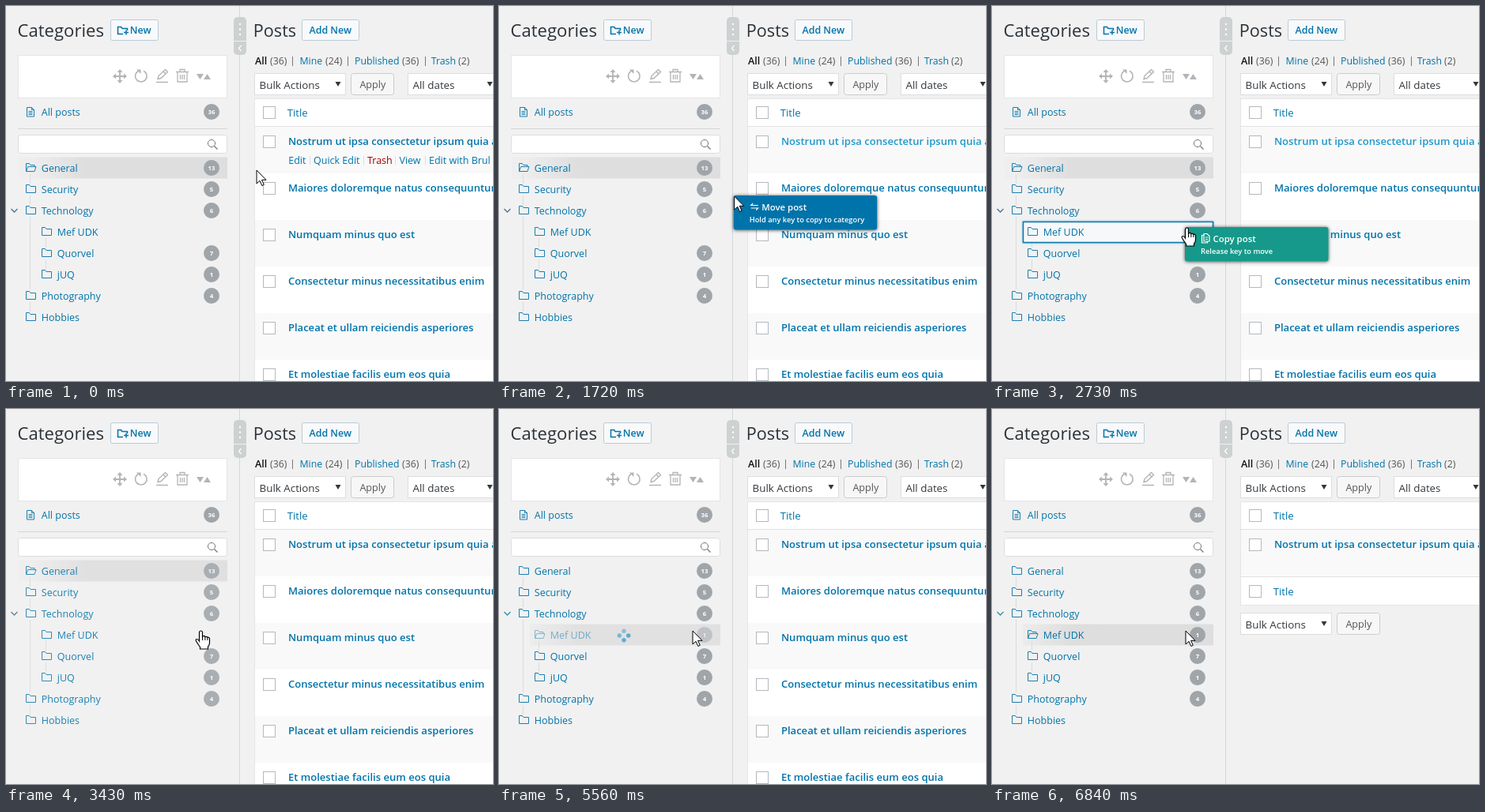
An HTML page that plays this animation: 616x475 px, repeating every 7910 ms.

```html
<!DOCTYPE html>
<html lang="en">
<head>
<meta charset="utf-8">
<title>Post categories</title>
<style>
html, body { margin: 0; width: 100%; height: 100%; overflow: hidden; background: #f1f1f1; }
svg { display: block; width: 100vw; height: 100vh; font-family: "Open Sans", "Noto Sans", sans-serif; }
</style>
</head>
<body>
<svg id="stage" viewBox="0 0 616 475"></svg>
<script>
const LOOP = 7910;
const BLUE = '#0073aa', HOVER = '#1f98cc', INK = '#2c3238', GREY = '#a0a5aa', TOOL = '#b2b5b8';
const stage = document.getElementById('stage');

// ---- markup helpers
const text = (x, y, size, fill, str, more = '') =>
  `<text x="${x}" y="${y}" font-size="${size}" fill="${fill}" ${more}>${str}</text>`;
const rect = (x, y, w, h, fill, stroke = 'none', r = 0, more = '') =>
  `<rect x="${x}" y="${y}" width="${w}" height="${h}" rx="${r}" fill="${fill}" stroke="${stroke}" ${more}/>`;
const line = (d, stroke, w = 1, more = '') =>
  `<path d="${d}" fill="none" stroke="${stroke}" stroke-width="${w}" ${more}/>`;
const shape = (d, fill) => `<path d="${d}" fill="${fill}"/>`;
const group = (id, body, x = 0, y = 0) => `<g id="${id}" transform="translate(${x} ${y})">${body}</g>`;
const semi = 'font-weight="600"';
const badge = (y, n, id = '') => `<g ${id}><circle cx="260" cy="${y}" r="10" fill="${GREY}"/>` +
  text(260, y + 2.8, 7.8, '#fff', n, 'font-weight="700" text-anchor="middle"') + '</g>';

// ---- sidebar
const FOLDER = 'M.5 10.5V.5h4l1.5 2h6.5v8z';
const OPEN = 'M.5 10.5V.5h4l1.5 2h5v2M.5 10.5l2.3-6h10.2l-2 6z';
const PAGE = 'M.5 .5h6l3 3v8.500h-9zM6.500 .5v3h3M2.500 5.500h5M2.500 7.500h5M2.500 9.500h5';
const PAGES = 'M3 2.5V.5h4l3 3v6.5H3zM3 2.5H.5v9.5h7v-2M5 5h3M5 7.5h3';
const nodes = [
  ['General', 0, 13], ['Security', 0, 5], ['Technology', 0, 6], ['Mef UDK', 1, 1],
  ['Quorvel', 1, 7], ['jUQ', 1, 1], ['Photography', 0, 4], ['Hobbies', 0, 0]
];

function treeRow([name, level, count], i) {
  const x = 25 + 20 * level, y = 205 + 27 * i;
  return group('row' + i,
    `<path id="icon${i}" d="${FOLDER}" transform="translate(${x} ${y - 6})" fill="none" stroke="#1b7fb0"/>` +
    text(x + 19.8, y + 4.8, 12.5, BLUE, name) +
    (count ? badge(y, count, `id="count${i}"`) : ''));
}

function sidebar() {
  const button = rect(132.5, 17.5, 60, 26, '#f8f9fa', '#b9cbd6', 2) +
    line('M148 35.5h-6.5v-9h4l1.5 2h6.5v2.5M149 33.5h6M152 30.5v6', BLUE, 1.5) +
    text(156.8, 35.3, 12.4, BLUE, 'New', semi);
  const tools = rect(15.5, 62.5, 264, 54, '#fff', '#e5e5e5') +
    line('M144 82v14M137 89h14', TOOL, 1.8) +
    shape('M144 80l3.5 4h-7zM144 98l3.5-4h-7zM135 89l4-3.5v7zM153 89l-4-3.5v7z', TOOL) +
    line('M167 82.5a7.3 7.3 0 1 0 7-.3', TOOL, 1.6) + shape('M165 80.5h5.5v5.5z', TOOL) +
    line('M190 96.5h15M192 92.5l1-4 8.500-8 3 3-8.500 8zM199 83l3 3', TOOL, 1.4) +
    line('M215 83.5h16M220 83v-2.5h6v2.5M217 84v12h12v-12M220.5 87v6M223 87v6M225.5 87v6', TOOL, 1.3) +
    shape('M241 86h9l-4.5 7zM250 93h9l-4.5-7z', TOOL);
  return text(14.6, 39, 22.1, INK, 'Categories') + button + tools +
    line(PAGE, '#1b7fb0', 1, 'transform="translate(26 128)"') +
    text(44.8, 138.8, 12.5, BLUE, 'All posts') + badge(134, 36) +
    line('M15 155.5h265', '#d5d5d5') +
    rect(15.5, 163.5, 264, 23, '#fff', '#ddd', 3) +
    `<circle cx="260" cy="174" r="4.6" fill="none" stroke="#777"/>` + line('M263.5 177.5l4 4', '#777', 1.2) +
    `<g id="tree">` +
    rect(16, 191.5, 264, 27, 'url(#fade)', 'none', 0, 'id="sel"') +
    line('M30.5 213v12M30.5 240v12M30.5 267v92M30.5 375v12M50.5 294v12M50.5 321v12', '#dcdcdc') +
    `<path id="chevron" d="M6.5 257l4 4 4-4" fill="none" stroke-width="1.3"/>` +
    rect(0, 0, 0, 26, '#f6f8f9', '#0f78ad', 0, 'id="drop" stroke-width="1.5" filter="url(#glow)"') +
    nodes.map(treeRow).join('') + '</g>' +
    group('spin', '<g id="dots">' + '<circle r="2.7" fill="#3a9bcb"/>'.repeat(4) + '</g>', 158, 287);
}

function divider() {
  return line('M295.5 0v475', '#d4d6d8') + rect(288, 14, 16, 48, '#cdd1d1', 'none', 5) +
    line('M288 44.5h16', '#f1f1f1') +
    [23, 29.5, 36].map(y => `<circle cx="296" cy="${y}" r="1.2" fill="#fff"/>`).join('') +
    line('M297.5 50l-3 3.5 3 3.5', '#fff', 1.2);
}

// ---- post list
const posts = [
  'Nostrum ut ipsa consectetur ipsum quia aut', 'Maiores doloremque natus consequuntur',
  'Numquam minus quo est', 'Consectetur minus necessitatibus enim',
  'Placeat et ullam reiciendis asperiores', 'Et molestiae facilis eum eos quia'
];
const check = y => rect(325.5, y - 7.5, 15, 15, '#fff', '#b4b9be');
const select = (x, y, w, label) => rect(x + .5, y + .5, w - 1, 27, '#fff', '#ddd') +
  text(x + 6.5, y + 19.8, 13.4, '#32373c', label) + shape(`M${x + w - 13.5} ${y + 11}h7l-3.5 6z`, '#32373c');
const bulk = y => select(314, y, 116, 'Bulk Actions') +
  rect(436.5, y + .5, 54, 27, '#f7f7f7', '#ccc', 3) + text(447.4, y + 19, 12.6, '#555', 'Apply');
const titleBar = y => check(y) + text(355.8, y + 4.8, 13.1, BLUE, 'Title');
const post = (i, id = '') => rect(315, 153 + 59 * i, 310, 59, i % 2 ? '#fff' : '#f9f9f9') + check(172 + 59 * i) +
  text(356.9, 176 + 59 * i, 13.07, BLUE, posts[i], semi + id);
const tableTop = h => select(508, 85, 114, 'All dates') + bulk(85) +
  rect(314.5, 117.5, 320, h, '#fff', '#e5e5e5') + line('M314 152.5h302', '#e1e1e1') + titleBar(135);

function lists() {
  const actions = [[357.2, 'Edit'], [389, 'Quick Edit'], [457, 'Trash', '#a00'], [497.5, 'View'], [535, 'Edit with Brul']];
  return `<g id="all">` + tableTop(400) + posts.map((p, i) => post(i, i ? '' : ' id="first"')).join('') +
    `<g id="actions">` + actions.map(([x, s, c = BLUE]) => text(x, 199.8, 12.5, c, s)).join('') +
    line('M384.5 190v11M452.5 190v11M492.5 190v11M530.5 190v11', '#ddd') + '</g></g>' +
    `<g id="one">` + tableTop(131) + post(0) + line('M314 212.5h302', '#e1e1e1') +
    titleBar(231) + bulk(258) + '</g>';
}

function heading() {
  const views = [[334, '(36)', '#555'], [371.5, 'Mine'], [404, '(24)', '#555'], [441, 'Published'],
    [501, '(36)', '#555'], [537.8, 'Trash'], [572, '(2)', '#555']];
  return text(312.8, 39, 21.6, INK, 'Posts') +
    rect(374.5, 17.5, 72, 26, '#f8f9fa', '#b9cbd6', 2) + text(383.5, 35.3, 12.4, BLUE, 'Add New', semi) +
    text(315, 74, 12.5, '#111', 'All', semi) +
    views.map(([x, s, c = BLUE]) => text(x, 74, 12.3, c, s)).join('') +
    line('M362.5 64v12M432.5 64v12M530.5 64v12', '#777');
}

// ---- drag label and pointer
function label(id, fill, icon, title, hint) {
  return `<g id="${id}">` + rect(0, 0, 181.5, 43.5, fill, 'none', 3, 'filter="url(#shadow)"') + icon +
    text(35.5, 19, 11.4, '#fff', title, semi) + text(20, 34.4, 9.3, '#fff', hint, semi) + '</g>';
}
const swap = line('M31 12.5h-9l2.5-2.5M22 16h9l-2.5 2.5', '#fff', 1.1);
const copy = line(PAGES, '#fff', 1.2, 'transform="translate(21 8)"');
const hand = 'M-2 13V2a2 2 0 0 1 4 0V8a1.7 1.7 0 0 1 3.4 0a1.7 1.7 0 0 1 3 .6a1.6 1.6 0 0 1 2.6 1.4' +
  'V15q0 3-2 5v3H-1v-2.5q-3-4-5-7.5q-1-2.5 1-2.5q1.5 0 3 2.5z';

stage.innerHTML = `<defs>
  <linearGradient id="fade" gradientUnits="userSpaceOnUse" x1="30" y1="0" x2="100" y2="0">
    <stop offset="0" stop-color="#dedede" stop-opacity=".15"/><stop offset="1" stop-color="#dedede"/>
  </linearGradient>
  <filter id="glow" x="-10%" y="-40%" width="120%" height="180%">
    <feDropShadow dx="0" dy="0" stdDeviation="1.3" flood-color="#1e8cbe" flood-opacity=".8"/></filter>
  <filter id="shadow" x="-10%" y="-30%" width="120%" height="170%">
    <feDropShadow dx="0" dy=".5" stdDeviation="2" flood-color="#000" flood-opacity=".7"/></filter>
  </defs>` + rect(0, 0, 616, 475, '#f1f1f1') + heading() + lists() + sidebar() + divider() +
  group('tip', label('move', BLUE, swap, 'Move post', 'Hold any key to copy to category') +
    label('copy', '#16998a', copy, 'Copy post', 'Release key to move')) +
  group('pointer',
    `<path id="arrow" d="M0 0V17L4 13.3L6.8 19.5L9.3 18.4L6.6 12.3H12z" fill="#fff" stroke="#000"/>` +
    `<g id="hand" transform="translate(1.5 0)"><path d="${hand}" fill="#fff" stroke="#000" stroke-width="1.2"/>` +
    line('M2 8v4M5.4 8.5v3.5M8.4 9v3', '#000') + '</g>');

// ---- motion
const el = {};
stage.querySelectorAll('[id]').forEach(n => el[n.id] = n);
const set = (id, name, v) => el[id].setAttribute(name, v);
const show = (id, on) => set(id, 'display', on ? 'inline' : 'none');
const ramp = (t, a, b) => Math.max(0, Math.min(1, (t - a) / (b - a)));

// the screen refreshes at these moments only
const ticks = [0, 350, 420, 500, 570, 650, 720, 1090, 1160, 1230, 1330, 1410, 1490, 1570, 1640, 1720, 1800, 1880,
  1950, 2020, 2100, 2180, 2250, 2730];
for (let t = 3360; t <= 4090; t += 73) ticks.push(t);
for (let t = 5560; t <= 6840; t += 80) ticks.push(t);
const hold = t => ticks.reduce((a, b) => b <= t ? b : a, 0);

const path = [[0, 317, 208], [280, 317, 208], [720, 362, 175], [1020, 362, 175], [1230, 366, 190],
  [1720, 297.7, 241], [1880, 277, 262], [2250, 245, 281], [LOOP, 245, 281]];
function pointerAt(t) {
  const i = path.findIndex(p => p[0] > t);
  const [t0, x0, y0] = path[i - 1], [t1, x1, y1] = path[i];
  const k = (t - t0) / (t1 - t0);
  return [x0 + (x1 - x0) * k, y0 + (y1 - y0) * k];
}

function draw(now) {
  const t = hold(now % LOOP);
  const [x, y] = pointerAt(t);
  const drag = t >= 1090 && t < 3360;
  const clicked = t >= 5560, loaded = t >= 6360, busy = clicked && !loaded;

  set('pointer', 'transform', `translate(${x} ${y})`);
  const isHand = !clicked && (x > 355 || x < 280);
  show('hand', isHand);
  show('arrow', !isHand);

  set('tip', 'transform', `translate(${x - 1} ${y - 1})`);
  show('tip', drag);
  show('move', t < 2730);
  show('copy', t >= 2730);

  const onTitle = x > 355 && y < 186;
  set('first', 'fill', drag || onTitle ? HOVER : BLUE);
  show('actions', x > 314 && y < 212);

  const inner = y >= 273;
  show('drop', drag && x < 280);
  set('drop', 'x', inner ? 39.5 : 16);
  set('drop', 'y', inner ? 273.5 : 246.5);
  set('drop', 'width', inner ? 240 : 263.5);

  const fade = Math.min(ramp(t, 3287, 3587), ramp(t, 4090, 3790));
  set('tree', 'opacity', 1 - .5 * fade);
  set('chevron', 'stroke', t < 3725 ? '#4c7392' : '#2a93a3');
  show('count3', t >= 3725);

  set('icon0', 'd', clicked ? FOLDER : OPEN);
  set('icon3', 'd', clicked ? OPEN : FOLDER);
  set('sel', 'x', clicked ? 39 : 16);
  set('sel', 'width', clicked ? 241 : 264);
  set('sel', 'y', clicked ? 272.5 : 191.5);
  set('sel', 'opacity', busy ? .85 : 1);
  set('row3', 'opacity', clicked ? .5 + .5 * ramp(t, 6280, 6600) : 1);

  show('spin', busy);
  [...el.dots.children].forEach((dot, i) => {
    const a = i * Math.PI / 2 + (t - 5560) / 1200 * Math.PI * 2;
    dot.setAttribute('cx', 5.7 * Math.cos(a));
    dot.setAttribute('cy', 5.7 * Math.sin(a));
    dot.setAttribute('opacity', .65 + .15 * Math.sin(t / 400 + i));
  });

  show('all', !loaded);
  show('one', loaded);
  set('all', 'opacity', 1 - .5 * ramp(t, 5560, 5900));
  set('one', 'opacity', .5 + .5 * ramp(t, 6280, 6840));
}

const start = performance.now();
function loop() {
  draw(performance.now() - start);
  requestAnimationFrame(loop);
}
loop();
</script>
</body>
</html>
```
